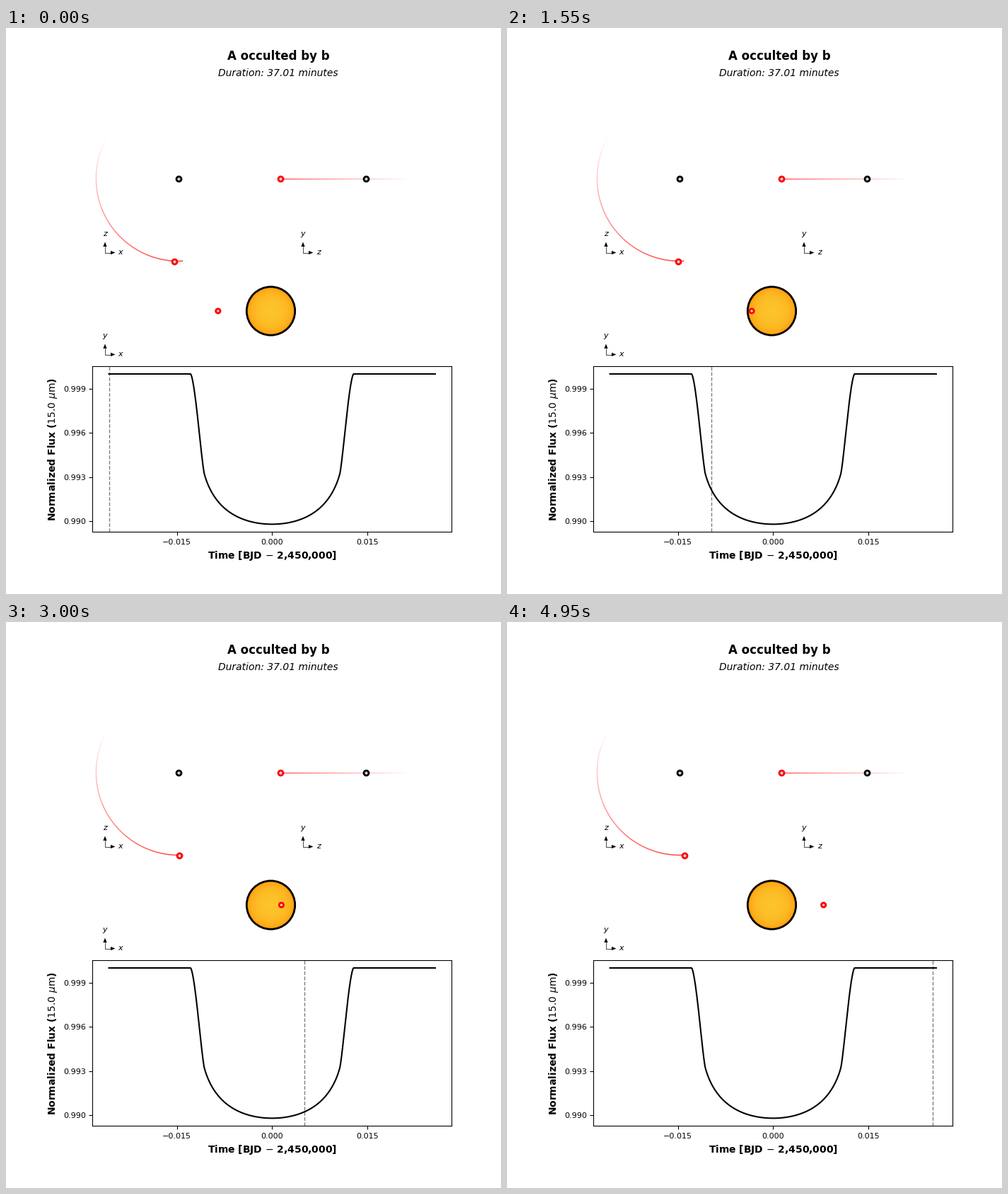
Write a matplotlib script that moves like this. It is 700 px wide and 800 px high and loops after 5000 ms.

```python
import numpy as np
import matplotlib.pyplot as plt
from matplotlib.animation import FuncAnimation
from matplotlib.collections import LineCollection
from matplotlib.patches import Circle, Polygon

W, H, DPI = 700, 800, 100
FRAMES, INTERVAL = 100, 50

HALF_DURATION = 37.01 / 2 / 1440      # days
HALF_SPAN = 2 * HALF_DURATION
RATIO = 0.0918                        # planet radius / star radius
DEPTH = 0.010216
U1, U2 = 0.4, 0.26                    # limb darkening

STAR = (374.5, 400)
STAR_R = 34.2
TOP = (244.2, 212.7)                  # star in the x-z view
SIDE = (508.8, 212.7)                 # star in the z-y view
TOP_R, SIDE_R = 116.8, 121.2          # orbit radius in each view
TOP_STEP, SKY_STEP = 0.129, 1.493     # planet speed, pixels per frame


def intensity(r):
    mu = np.sqrt(np.clip(1 - r ** 2, 0, 1))
    return np.where(r < 1, 1 - U1 * (1 - mu) - U2 * (1 - mu) ** 2, 0)


def light_curve(time):
    """Flux while the planet's disk crosses the star's centre line."""
    n = 60
    rad = RATIO * np.sqrt((np.arange(n) + 0.5) / n)
    ang = np.pi * (np.arange(n) + 0.5) / n
    px = np.outer(rad, np.cos(ang)).ravel()
    py = np.outer(rad, np.sin(ang)).ravel()
    dist = time / HALF_DURATION * (1 + RATIO)
    blocked = np.array([intensity(np.hypot(d + px, py)).mean() for d in dist])
    return 1 - DEPTH * blocked / blocked.max()


def add_trail(ax, x, y):
    pts = np.column_stack([x, y])
    colors = [(1, 0, 0, a) for a in np.linspace(0, 1, len(pts) - 1)]
    segments = np.stack([pts[:-1], pts[1:]], axis=1)
    ax.add_collection(LineCollection(segments, colors=colors, linewidths=1))


def add_marker(ax, x, y, color):
    return ax.plot([x], [y], "o", ms=5, mfc="lightgrey", mec=color,
                   mew=2, zorder=5)[0]


def add_axes_key(ax, x, y, right, up):
    ax.plot([x, x, x + 9], [y - 9, y, y], color="k", lw=0.5)
    ax.add_patch(Polygon([(x, y - 15), (x - 2.6, y - 8.5), (x + 2.6, y - 8.5)],
                         fc="k", lw=0))
    ax.add_patch(Polygon([(x + 14.5, y), (x + 8, y - 2.6), (x + 8, y + 2.6)],
                         fc="k", lw=0))
    style = dict(fontsize=8, style="italic", ha="center", va="center")
    ax.text(x + 22, y, right, **style)
    ax.text(x, y - 26, up, **style)


def add_star(ax):
    center, edge = np.array([252, 195, 42]) / 255, np.array([255, 140, 0]) / 255
    dim = 1 - U1 - U2
    for r in np.linspace(1, 0.02, 50):
        mix = max(0, (float(intensity(r)) - dim) / (1 - dim))
        ax.add_patch(Circle(STAR, r * STAR_R, lw=0,
                            fc=edge + (center - edge) * mix))
    ax.add_patch(Circle(STAR, STAR_R, fc="none", ec="k", lw=2))


fig = plt.figure(figsize=(W / DPI, H / DPI), dpi=DPI, facecolor="white")

# Scene in pixel coordinates, y downwards
scene = fig.add_axes([0, 0, 1, 1])
scene.set(xlim=(0, W), ylim=(H, 0))
scene.axis("off")

scene.text(385, 40, "A occulted by b", fontsize=12, weight="bold",
           ha="center", va="center")
scene.text(385, 64, "Duration: 37.01 minutes", fontsize=10, style="italic",
           ha="center", va="center")

phase = np.radians(np.linspace(-120, 3, 400))
add_trail(scene, TOP[0] + TOP_R * np.sin(phase), TOP[1] + TOP_R * np.cos(phase))
add_trail(scene, SIDE[0] - SIDE_R * np.cos(phase), np.full(400, SIDE[1]))

add_marker(scene, *TOP, "k")
add_marker(scene, *SIDE, "k")
add_marker(scene, SIDE[0] - SIDE_R, SIDE[1], "r")
top_planet = add_marker(scene, TOP[0], TOP[1] + TOP_R, "r")

add_axes_key(scene, 140, 317.5, "x", "z")
add_axes_key(scene, 420, 317.5, "z", "y")
add_axes_key(scene, 140, 461.5, "x", "y")

add_star(scene)
sky_planet = Circle(STAR, RATIO * STAR_R, fc="lightgrey", ec="r", lw=2, zorder=6)
scene.add_patch(sky_planet)

# Light curve
plot = fig.add_axes([0.175, 0.11, 0.725, 233.66 / H])
time = np.linspace(-HALF_SPAN, HALF_SPAN, 1001)
plot.plot(time, light_curve(time), "k-", lw=1.5)
plot.set_xlim(-1.1 * HALF_SPAN, 1.1 * HALF_SPAN)
plot.set_ylim(1 - 1.05 * DEPTH, 1 + 0.05 * DEPTH)
plot.set_xticks([-0.015, 0, 0.015])
plot.set_yticks([0.990, 0.993, 0.996, 0.999])
plot.xaxis.set_major_formatter("{x:.3f}")
plot.yaxis.set_major_formatter("{x:.3f}")
plot.tick_params(labelsize=8)
plot.set_xlabel(r"Time [BJD $-$ 2,450,000]", fontsize=10, weight="bold")
plot.set_ylabel(r"Normalized Flux ($15.0\ \mu\mathrm{m}$)", fontsize=10,
                weight="bold")
tracker = plot.axvline(-HALF_SPAN, color="k", alpha=0.5, lw=1, ls="--")


def update(k):
    step = k - FRAMES / 2
    t = HALF_SPAN * step / (FRAMES / 2)
    tracker.set_xdata([t, t])
    top_planet.set_xdata([TOP[0] + TOP_STEP * step])
    sky_planet.center = (STAR[0] + SKY_STEP * step, STAR[1])
    return tracker, top_planet, sky_planet


anim = FuncAnimation(fig, update, frames=FRAMES, interval=INTERVAL,
                     repeat=True, repeat_delay=0)
plt.show()
```
